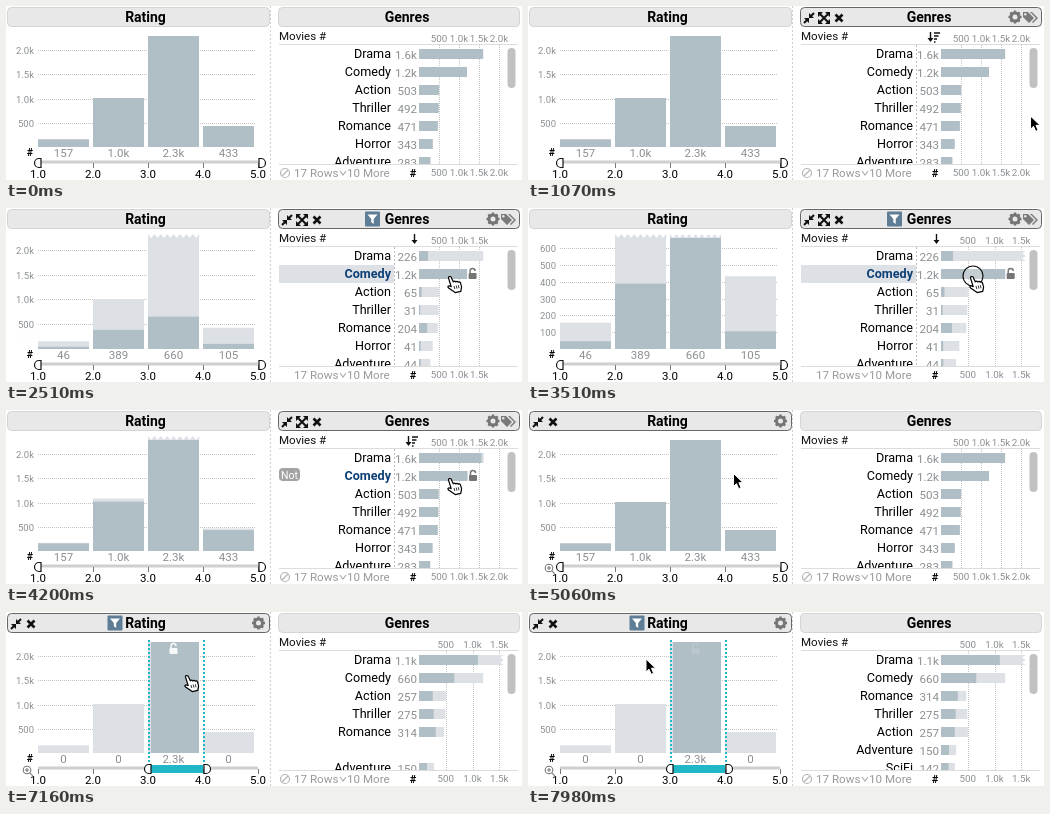
An HTML page that plays this animation: 516x174 px, repeating every 8000 ms.

```html
<!DOCTYPE html>
<html lang="en">
<head>
<meta charset="utf-8">
<title>Linked charts</title>
<style>
html, body { margin: 0; width: 100%; height: 100%; overflow: hidden; background: #fff; }
svg { display: block; font-family: Roboto, Arial, sans-serif; }
</style>
</head>
<body>
<svg id="stage" width="516" height="174" viewBox="0 0 516 174"></svg>
<script>
const LOOP = 8000;
const DARK = '#b0bec5', LIGHT = '#dde1e6', ORANGE = '#ff6a22', CYAN = '#20b8c8', GREY = '#8b8f92', ICON = '#757575';
const BASE = 141, LEFT = 413, MAX_H = 111, MAX_W = 84;

// counts: [all, comedies only, rating 3-4 only]
const ratings = [[157, 46, 0], [1010, 389, 0], [2290, 660, 2290], [433, 105, 0]];
const genres = [
  ['Drama', 1603, 226, 1100], ['Comedy', 1200, 1200, 660], ['Action', 503, 65, 257],
  ['Thriller', 492, 31, 275], ['Romance', 471, 204, 314], ['Horror', 343, 41, 115],
  ['Adventure', 283, 44, 150], ['SciFi', 260, 30, 142]
].map(([name, ...counts]) => ({ name, counts }));
const sortedSlot = [0, 1, 4, 3, 2, 9, 5, 6];

// chart states: which count is active, and pixels per unit in each chart
const R0 = MAX_H / 2290, R1 = MAX_H / 660, G0 = 0.04, G1 = 0.0535;
const states = {
  all: { set: 0, r: R0, g: G0 },
  comedy: { set: 1, r: R0, g: G0 },
  comedyZoom: { set: 1, r: R1, g: G1 },
  mid: { set: 2, r: R0, g: G0 },
  midZoom: { set: 2, r: R0, g: G1 }
};
const changes = [
  [2150, 2450, 'comedy'], [2490, 2910, 'comedyZoom'], [3700, 4270, 'all'],
  [6050, 6350, 'mid'], [6370, 6740, 'midZoom']
];
const moves = [
  [840, 516, 120], [1590, 445, 68], [4430, 445, 68], [5230, 182, 63],
  [7160, 182, 63], [7700, 118, 91], [7975, 118, 91], [7980, 118, 47]
];

const clamp = v => Math.max(0, Math.min(1, v));
const lerp = (a, b, k) => a + (b - a) * k;
const ease = k => k < .5 ? 2 * k * k : 1 - 2 * (1 - k) * (1 - k);
const span = (t, a, b) => ease(clamp((t - a) / (b - a)));
const within = (t, a, b) => t >= a && t < b;
const short = n => n >= 1000 ? (n / 1000).toFixed(1) + 'k' : String(n);

const rect = (x, y, w, h, fill, more = '') =>
  w > 0 && h > 0 ? `<rect x="${x}" y="${y}" width="${w}" height="${h}" fill="${fill}" ${more}/>` : '';
const path = (d, stroke, width = 1, more = '') =>
  `<path d="${d}" fill="none" stroke="${stroke}" stroke-width="${width}" ${more}/>`;
const fillPath = (d, fill, more = '') => `<path d="${d}" fill="${fill}" ${more}/>`;
const text = (x, y, s, size, fill = '#000', anchor = 'middle', more = '') =>
  `<text x="${x}" y="${y}" font-size="${size}" fill="${fill}" text-anchor="${anchor}" ${more}>${s}</text>`;
const at = (x, y, body, more = '') => `<g transform="translate(${x} ${y})" ${more}>${body}</g>`;
const DOTS = 'stroke-dasharray="1 1"';
const BOLD = 'font-weight="bold"';

const cross = path('M-3.5-3.5l7 7m0-7l-7 7', '#111', 2.6);
const shrink = path('M-5 5l4-4m2-2l4-4', '#111', 2) + fillPath('M-5 0h5v5zM0-5v5h5z', '#111');
const expand = path('M-4-4l8 8m0-8l-8 8', '#111', 2) +
  fillPath('M-6-6h5l-5 5zM6-6v5l-5-5zM-6 6v-5l5 5zM6 6h-5l5-5z', '#111');
const gear = `<circle r="4" fill="none" stroke="${ICON}" stroke-width="3"/>` +
  path('M0-6.5v2m0 9v2M-6.5 0h2m9 0h2M-4.6-4.6l1.4 1.4m6.4 6.4l1.4 1.4M4.6-4.6l-1.4 1.4m-6.4 6.4l-1.4 1.4', ICON, 2.4);
const tag = fillPath('M-7-5h5l6 6-5 5-6-6zM0-5h2l6 6-5 5-1-1 4-4z', ICON) + '<circle cx="-4.7" cy="-2.7" r="1.2" fill="#e8e8e8"/>';
const filterIcon = rect(-7.5, -7.5, 15, 15, '#5f7d95', 'rx="1"') + fillPath('M-5-4.5h10l-3.8 4.5v5l-2.4-1.8v-3.2z', '#fff');
const lock = fill => rect(-4, -1, 8, 6, fill, 'rx="1"') + path('M-2.5-1v-2a2.5 2.5 0 0 1 5 0', fill, 1.5);
const noValue = color => `<circle r="4.5" fill="none" stroke="${color}" stroke-width="1.2"/>` + path('M-3 3l6-6', color, 1.2);
const zoom = '<circle r="3.8" fill="none" stroke="#777" stroke-width="1.1"/>' + path('M-2 0h4M0-2v4M2.8 2.8l3 3', '#777', 1.1);
const arrow = fillPath('M0 0v13l3-2.8 2.2 5 2.4-1-2.2-5h4.2z', '#000', 'stroke="#fff"');
const hand = fillPath('M-2.5 2q0-2.2 2.4-1.2l2.4 5q1.2-1.4 2.4.1 1.6-1.2 2.5.2 2-.6 2.4 1.2l1 3.5-.8 4.6-5.6 1.2-6.6-4.6q-1.6-1.8.4-2.2l2.2.8z',
  '#fff', 'stroke="#000" stroke-width="1.2" stroke-linejoin="round"') + path('M3 10l.8 3m1.4-3.4l.8 3m1.3-3.4l.7 3', '#000', .8);

function stateAt(t) {
  let from = states.all, to = states.all, k = 1, axisK = 1;
  for (const [a, b, name] of changes) {
    if (t < a) break;
    from = to;
    to = states[name];
    k = span(t, a, b);
    axisK = span(t, a, lerp(a, b, .75));
  }
  const size = (key, pick) => lerp(pick(from) * from[key], pick(to) * to[key], k);
  return {
    axisR: lerp(from.r, to.r, axisK),
    axisG: lerp(from.g, to.g, axisK),
    g: lerp(from.g, to.g, k),
    r: lerp(from.r, to.r, k),
    total: (c, key) => size(key, () => c[0]),
    active: (c, key) => size(key, s => c[s.set])
  };
}

function cursorAt(t) {
  if (t < moves[0][0]) return null;
  let i = moves.length - 1;
  while (moves[i][0] > t) i--;
  const [t0, x0, y0] = moves[i], [t1, x1, y1] = moves[i + 1] || [LOOP, x0, y0];
  const k = span(t, t0, t1);
  return [lerp(x0, x1, k), lerp(y0, y1, k)];
}

function header(x, w, title, center, iconX, hover, filtered) {
  return rect(x + .5, 1.5, w, 19, '#e8e8e8', `rx="4" stroke="${hover ? '#666' : '#d4d4d4'}"`) +
    text(center, 16, title, 14, '#000', 'middle', BOLD) +
    (filtered ? at(iconX, 11, filterIcon) : '');
}

function ratingChart(t, s, ui) {
  let out = header(1, 262, 'Rating', 139.5, 109, ui.overRating, ui.midOn);
  if (ui.overRating) out += at(10, 12, shrink) + at(25, 12, cross) + at(252.5, 11, gear) + at(21, 158, zoom);

  const fine = clamp((s.axisR - R0) / (R1 - R0));
  const ticks = (step, count, opacity) => {
    let g = '';
    for (let i = 1; i <= count; i++) {
      const y = BASE - i * step * s.axisR;
      if (y > 28) g += path(`M32 ${Math.round(y) + .5}H250`, '#c4c4c4', 1, DOTS) + text(28, y + 4, short(i * step), 9.5, GREY, 'end');
    }
    return `<g opacity="${opacity}">${g}</g>`;
  };
  out += ticks(500, 4, 1 - fine) + (fine > 0 ? ticks(100, 6, fine) : '');

  ratings.forEach((c, i) => {
    const x = 32 + 55 * i;
    const column = (h, fill, inset = 0) => rect(x + inset, BASE - Math.min(h, MAX_H), 51 - inset, Math.min(h, MAX_H), fill);
    const total = s.total(c, 'r');
    out += column(total, LIGHT);
    if (total > MAX_H + 1 && fine > 0) out += fillPath(`M${x} 30v-4` + 'l3.2 4l3.2-4'.repeat(8) + 'v4z', LIGHT);
    out += column(s.active(c, 'r'), DARK, i === 2 ? 3 * span(t, 6100, 6350) : 0);
    out += column(c[ui.set] * s.r * ui.preview, ORANGE);
    out += text(x + 25.5, 150.5, short(c[ui.set]), 11.5, ui.labelColor);
  });
  if (t >= 5290) out += at(167.5, 37, lock('#fff'), `opacity="${lerp(.9, .15, span(t, 7700, 7980))}"`);

  const k = span(t, 6050, 6350), lo = lerp(32, 142, k), hi = lerp(252, 197, k);
  out += text(24, 150, '#', 10.5, '#000', 'middle', BOLD);
  out += rect(32, 154.5, 220, 3, '#cfcfcf');
  if (t >= 6030) {
    out += rect(142, 153, 55, 8, CYAN);
    for (const x of [lo, hi]) out += path(`M${x + 1} 28V153`, CYAN, 2, 'stroke-dasharray="2 2"');
  }
  for (let i = 0; i < 5; i++) {
    const x = 32 + 55 * i;
    out += path(`M${x + .5} 157v5`, '#777') + text(x, 171.5, (i + 1).toFixed(1), 11.5);
  }
  const knob = 'fill="#fff" stroke="#111" stroke-width="1.2"';
  out += `<path d="M${lo + 3} 152.5h-2a4.5 4.5 0 0 0 0 9h2z" ${knob}/>`;
  out += `<path d="M${hi + 1} 152.5h2a4.5 4.5 0 0 1 0 9h-2z" ${knob}/>`;
  return out;
}

function genreRow(row, i, t, s, ui) {
  if (row.name === 'Horror' && t >= 7160) return '';
  const y = 48 + 18 * lerp(i, sortedSlot[i], span(t, 7240, 7860));
  const total = s.total(row.counts, 'g');
  const picked = row.name === 'Comedy' && ui.overComedy;
  const bar = (w, fill) => rect(LEFT, y - 5, Math.min(w, MAX_W), 10, fill);
  let out = '';
  if (picked && ui.comedyOn) out += rect(273, y - 9, 115, 18, LIGHT);
  out += text(385, y + 4, row.name, 12.6, picked ? '#0d3f75' : '#000', 'end', picked ? BOLD : '');
  out += text(411, y + 4.5, short(row.counts[ui.set]), 11.6, ui.labelColor, 'end');
  out += bar(total, LIGHT);
  if (total > MAX_W) out += fillPath(`M498 ${y - 5}l-4 2.5 4 2.5-4 2.5 4 2.5z`, '#fff');
  out += bar(s.active(row.counts, 'g'), DARK) + bar(row.counts[ui.set] * s.g * ui.preview, ORANGE);
  if (picked) {
    out += at(LEFT + total + 5.5, y, lock(ui.preview > 0 ? '#cfcfcf' : '#757575'));
    if (!ui.comedyOn) out += rect(273, y - 8, 21, 13, '#a3a3a3', 'rx="4"') + text(283.5, y + 2.5, 'Not', 10.5, '#fff');
  }
  return out;
}

function genreChart(t, s, ui) {
  let out = header(272, 241, 'Genres', 401, 366.5, ui.overGenres, ui.comedyOn);
  if (ui.overGenres) {
    out += at(281, 12, shrink) + at(296, 12, expand) + at(311, 12, cross) + at(487, 11, gear) + at(502, 11, tag, 'opacity=".95"');
    const x = ui.set ? 408.5 : 402.5;
    out += path(`M${x} 26v8`, '#111', 1.4) + fillPath(`M${x - 3} 32h6l-3 4z`, '#111');
    if (!ui.set) out += path('M406 27h6m-6 3h4.5m-4.5 3h3m-3 3h1.5', '#111', 1.4);
    out += path('M388.5 39V158', '#bbb', 1, 'stroke-dasharray="2 2"');
  }
  out += text(273, 34, 'Movies #', 11.6, '#111', 'start');
  out += path('M273 38.5H512M273 158.5H512', '#dcdcdc');
  for (let v = 500; v <= 2000; v += 500) {
    const x = LEFT + v * s.axisG;
    if (x > 498 || (v === 2000 && ui.filtered)) continue;
    out += path(`M${Math.round(x) + .5} 39V158`, '#c4c4c4', 1, DOTS);
    for (const y of [36, 170]) out += text(x, y, short(v), 9.8, GREY);
  }
  out += '<g clip-path="url(#list)">' + genres.map((row, i) => genreRow(row, i, t, s, ui)).join('') + '</g>';
  if (within(t, 1650, 2150)) out += path('M461 72V170', '#ffb494', 1.5, 'stroke-dasharray="3 2"');
  out += rect(501.5, 42, 8, 40, '#c1c1c1', 'rx="4"');
  if (!ui.comedyOn) out += at(279, 167, noValue(within(t, 5870, 6250) ? '#e2603c' : '#b5b5b5'));
  out += text(288, 170.5, '17 Rows', 11.6, '#999', 'start') + path('M334 165l3 4 3-4', '#aaa', 1.1);
  out += text(341, 170.5, '10 More', 11.6, '#999', 'start');
  return out + text(407, 170.5, '#', 11, '#000', 'middle', BOLD);
}

function pointer(t, ui) {
  const p = cursorAt(t);
  if (!p) return '';
  const pointing = ui.overComedy || within(t, 5230, 7200);
  const click = [2060, 3510, 5880].some(c => within(t, c, c + 140));
  return at(p[0], p[1], (click ? '<circle r="10" fill="#fff" fill-opacity=".25" stroke="#111" stroke-width="1.2"/>' : '') +
    (pointing ? hand : arrow));
}

function draw(t) {
  const first = within(t, 1650, 2150), second = within(t, 5290, 6030);
  const ui = {
    overGenres: within(t, 1000, 4680),
    overRating: t >= 4850,
    overComedy: within(t, 1590, 4480),
    comedyOn: within(t, 2200, 3680),
    midOn: t >= 6100,
    filtered: within(t, 2150, 3680) || t >= 6030,
    set: within(t, 1650, 3680) ? 1 : t >= 5290 ? 2 : 0,
    labelColor: first || second ? '#f4511e' : GREY,
    preview: t < 4000 ? span(t, 1650, 1842) * (1 - span(t, 2150, 2300))
      : span(t, 5290, 5600) * (1 - span(t, 6060, 6250))
  };
  const s = stateAt(t);
  stage.innerHTML = '<clipPath id="list"><rect x="272" y="39" width="240" height="119"/></clipPath>' +
    path('M264.5 0V174', '#cfcfcf', 1, 'stroke-dasharray="2 2"') +
    ratingChart(t, s, ui) + genreChart(t, s, ui) + pointer(t, ui);
}

const stage = document.getElementById('stage');
const start = performance.now();
function tick() {
  draw((performance.now() - start) % LOOP);
  requestAnimationFrame(tick);
}
tick();
</script>
</body>
</html>
```
